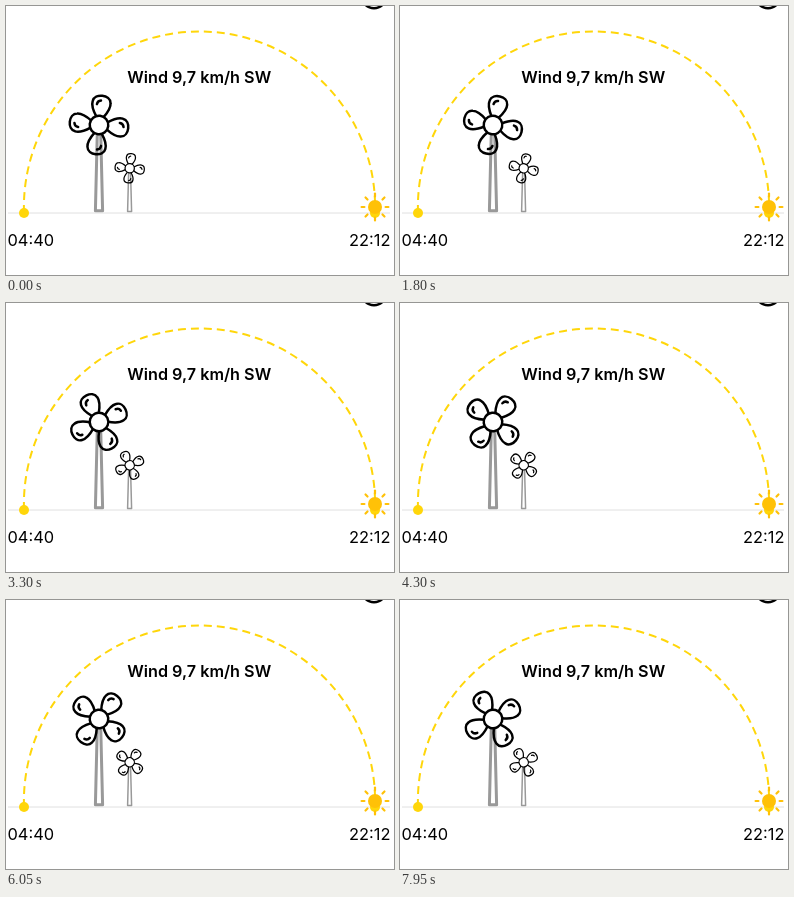
An HTML page for the animation above (8 s loop, 388x269 px).

```html
<!DOCTYPE html>
<html lang="en">
<head>
<meta charset="utf-8">
<title>Wind</title>
<style>
  html, body { margin: 0; width: 100%; height: 100%; overflow: hidden; background: #fff; }
  svg { display: block; width: 388px; height: 269px; }
  text { font: 400 16.4px Inter, "Open Sans", sans-serif; }
  .wind { font-size: 16.2px; font-weight: 600; }
  .tower { fill: #fff; stroke: #999; stroke-linejoin: round; }
  .ink { fill: none; stroke: #000; stroke-width: 2.5; stroke-linecap: round; }
</style>
</head>
<body>
<svg viewBox="0 0 388 269">
  <defs>
    <g id="petal" class="ink">
      <path d="M-3.5-8C-7-13-10-18-9-23C-8-31.5 8-31.5 9-23C10-18 7-13 3.5-8"/>
      <path d="M-4.4-20.5Q-4.2-24-.8-24.6"/>
    </g>
    <g id="rotor">
      <use href="#petal"/>
      <use href="#petal" transform="rotate(90)"/>
      <use href="#petal" transform="rotate(180)"/>
      <use href="#petal" transform="rotate(270)"/>
      <circle class="ink" r="9.3" style="fill: #fff"/>
    </g>
  </defs>

  <path d="M2 207H384" stroke="#e0e0e0"/>
  <circle class="ink" cx="368" cy="-10.3" r="12.5"/>
  <path d="M18 207A175.6 175.6 0 1 1 369 207" fill="none" stroke="#ffd60a" stroke-width="2" stroke-dasharray="8 5"/>
  <g fill="#ffd60a">
    <circle cx="18" cy="207" r="5"/>
    <circle cx="369" cy="207" r="5"/>
  </g>
  <g transform="translate(369 201)" fill="#ffc107">
    <circle r="7"/>
    <g id="rays" stroke="#ffc107" stroke-width="2.2" stroke-linecap="round"></g>
  </g>

  <path class="tower" d="M91.4 122H94.6L96.6 204.8H89.4Z" stroke-width="3"/>
  <path class="tower" d="M122.7 164H124.5L125.6 205.4H121.6Z" stroke-width="1.5"/>
  <use class="spin" href="#rotor" data-place="translate(93 119)"/>
  <use class="spin" href="#rotor" data-place="translate(123.7 162.3) scale(.5)"/>

  <text class="wind" x="193.2" y="77.2" text-anchor="middle">Wind 9,7 km/h SW</text>
  <text x="1.5" y="240.2">04:40</text>
  <text x="384.5" y="240.2" text-anchor="end">22:12</text>
</svg>
<script>
  const LOOP = 8000, STEP = 50;
  const START_ANGLE = 6.5, DEGREES_PER_MS = 0.154;
  const rotors = document.querySelectorAll('.spin');

  document.getElementById('rays').innerHTML = Array.from({ length: 8 }, (_, i) =>
    `<path d="M0-10.6V-13.4" transform="rotate(${i * 45})"/>`).join('');

  function draw(now) {
    let time = Math.floor(now % LOOP / STEP) * STEP;
    if (time < 2 * STEP) time = 0; // the opening pose is held for two steps
    const angle = START_ANGLE + time * DEGREES_PER_MS;
    for (const rotor of rotors)
      rotor.setAttribute('transform', `${rotor.dataset.place} rotate(${angle})`);
  }

  const begin = performance.now();
  function tick() {
    draw(performance.now() - begin);
    requestAnimationFrame(tick);
  }
  tick();
</script>
</body>
</html>
```
